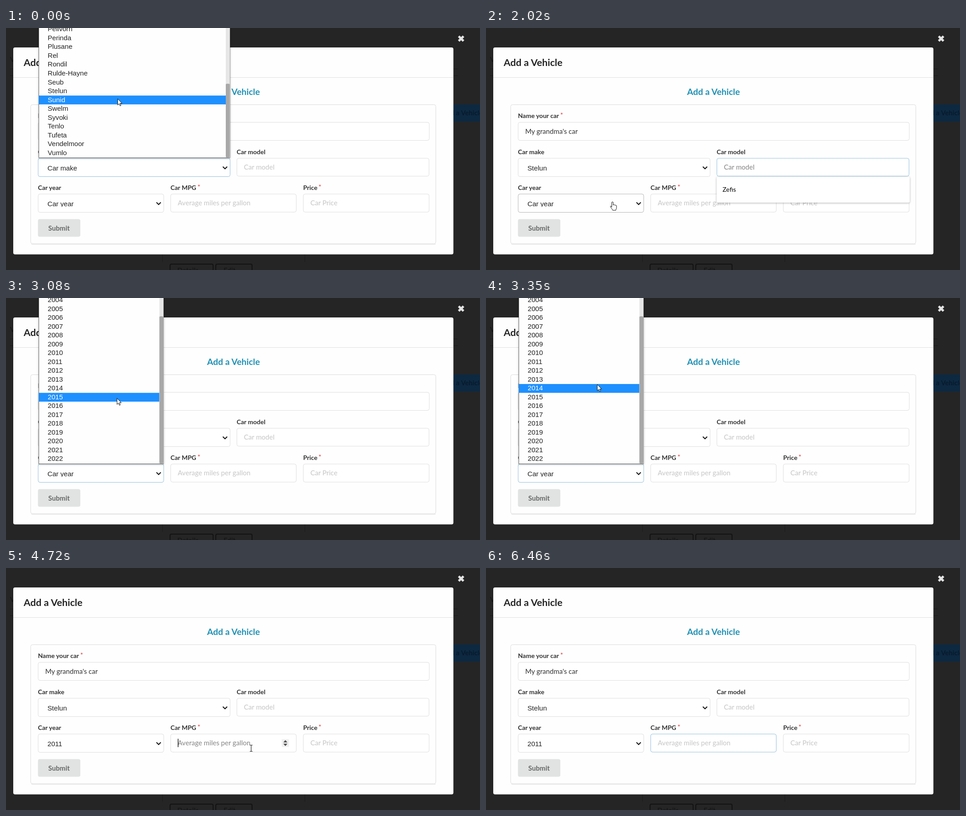
Recreate the animation shown at these times as an HTML page. Size 1046 by 535 pixels, loop 6560 ms.

```html
<!DOCTYPE html>
<html lang="en">
<head>
<meta charset="utf-8">
<title>Add a Vehicle</title>
<style>
  html, body { margin: 0; width: 100%; height: 100%; overflow: hidden; background: #252525; }
  svg { display: block; width: 100vw; height: 100vh; }
  text { font-family: Lato, sans-serif; font-size: 15.1px; fill: #333; white-space: pre; }
  .label { font-size: 14px; font-weight: 700; }
  .star { fill: #d8504e; }
  .hint { fill: #c6c6c6; }
  .hint.on { fill: #858585; }
  .native, .list text { font-family: "Liberation Sans", Arial, sans-serif; font-size: 15.1px; fill: #222; }
  .list text.on { fill: #fff; }
  .field { fill: #fff; stroke: #dedede; }
  .field.hover { stroke: #b4b4b5; }
  .field.focus { stroke: #92c0da; }
  .chevron { fill: none; stroke: #111; stroke-width: 2; }
  .list, .popup { filter: drop-shadow(0 1px 2px rgba(0, 0, 0, .3)); }
  .dim { fill: none; stroke: #191919; }
  .dimtext { fill: #161616; font-weight: 700; }
</style>
</head>
<body>
<svg id="stage" viewBox="0 0 1046 535">
  <defs>
    <clipPath id="yearClip"><rect x="85" y="370" width="200" height="25.3"/></clipPath>
  </defs>

  <!-- dimmed page -->
  <rect width="1046" height="535" fill="#252525"/>
  <text class="dimtext" x="9" y="75" font-size="19">Vehicles</text>
  <path class="dim" d="M9 90.5H997M9 105.5H997M345.5 495V517M659.5 495V517"/>
  <rect x="940" y="169" width="120" height="38" fill="#0d2941"/>
  <text x="962" y="193" style="fill:#081a2b;font-weight:700">Add a Vehicle</text>
  <g class="dim" style="stroke:#121212;stroke-width:2">
    <rect x="362" y="522" width="95" height="40" rx="3"/>
    <rect x="463" y="522" width="80" height="40" rx="3"/>
  </g>
  <text class="dimtext" x="378" y="541">Details</text>
  <text class="dimtext" x="480" y="541">Edit</text>
  <path d="M999 18.2L1009.6 28.8M1009.6 18.2L999 28.8" stroke="#e4e4e4" stroke-width="5"/>

  <!-- dialog -->
  <rect x="16" y="43" width="971.3" height="457.5" rx="4" fill="#fefefe"/>
  <path d="M16 109.5H987" stroke="#dedede"/>
  <text x="39" y="84" style="font-size:21.6px;font-weight:700;fill:#242424">Add a Vehicle</text>
  <text x="502" y="148" text-anchor="middle" style="font-size:19.4px;font-weight:700;fill:#2190b3">Add a Vehicle</text>
  <path d="M56 478H948" stroke="#ececec" stroke-width="2"/>
  <rect x="54.5" y="169.5" width="894" height="307.5" rx="4" fill="#fefefe" stroke="#dcdcdc"/>
  <g id="form"></g>
  <rect x="70.5" y="422.5" width="93.5" height="39" rx="4" fill="#e1e3e3"/>
  <text x="117" y="447.5" text-anchor="middle" style="font-weight:700;fill:#666">Submit</text>

  <g id="spinner">
    <rect x="608.5" y="378.5" width="16" height="17" fill="#efefef"/>
    <path d="M612 385.5l4.5-5 4.5 5zM612 388.5l4.5 5 4.5-5z" fill="#4d4d4d"/>
  </g>
  <path id="caret" d="M379.7 377.5V396" stroke="#111" stroke-width="1.4"/>
  <g id="popup" class="popup">
    <rect x="509" y="329" width="426" height="57" rx="3" fill="#fff"/>
    <text x="522" y="361.5" style="font-size:14px;fill:#000">Zefis</text>
  </g>
  <g id="lists"></g>

  <g id="cursor">
    <path id="arrow" d="M.5 .5V14.3L3.6 11.4 5.7 16.2 7.8 15.3 5.7 10.6H10Z" fill="#fff" stroke="#111"/>
    <path id="beam" d="M-3-7H-1L0-6.2 1-7H3M0-6.2V6.2M-3 7H-1L0 6.2 1 7H3" fill="none" stroke="#222" stroke-width="1.2"/>
    <path id="hand" transform="translate(-5)" fill="#fff" stroke="#111"
      d="M3.5 12V2a1.6 1.6 0 0 1 3.2 0v5.5c0-1.6 2.7-1.4 2.7.3 .3-1.3 2.5-1 2.5.6 .4-1 2.1-.6 2.1.8v4.3c0 2-1.5 3-1.5 5.5H5.5c0-2-4-5.5-5-8.2-.4-1.5 1.4-2 3 1.2Z"/>
  </g>
</svg>

<script>
const LOOP = 6560, ROW = 19.52;
const $ = id => document.getElementById(id);

function add(parent, tag, attrs, text) {
  const el = document.createElementNS('http://www.w3.org/2000/svg', tag);
  for (const k in attrs) el.setAttribute(k, attrs[k]);
  if (text) el.textContent = text;
  parent.appendChild(el);
  return el;
}
const show = (el, on) => el.style.display = on ? '' : 'none';

// form fields
function field(label, x, y, w, h, text, kind, required) {
  const form = $('form');
  const caption = add(form, 'text', { class: 'label', x, y: y - 9 }, label);
  if (required) add(caption, 'tspan', { class: 'star', dx: 3, dy: -2 }, '*');
  const box = add(form, 'rect', { x: x + .5, y: y + .5, width: w, height: h, rx: 4 });
  const select = kind === 'select';
  const value = add(form, 'text', {
    class: select ? 'native' : kind, x: x + (select ? 21 : 16), y: y + (select ? 27 : 25.5)
  }, text);
  if (select) add(form, 'path', { class: 'chevron', d: `M${x + w - 15.5} ${y + 19}l4.8 4.8 4.8-4.8` });
  const hit = (px, py) => px > x && px < x + w && py >= y && py < y + h;
  return { box, value, select, hit };
}
const fields = {
  name: field('Name your car', 70.5, 208, 863, 40, "My grandma's car", 'plain', true),
  make: field('Car make', 70.5, 287.5, 423.5, 40.5, 'Car make', 'select'),
  model: field('Car model', 509, 287.5, 424, 39.5, 'Car model', 'hint'),
  year: field('Car year', 70.5, 366.5, 277, 40.5, 'Car year', 'select'),
  mpg: field('Car MPG', 363, 366.5, 277, 40, 'Average miles per gallon', 'hint', true),
  price: field('Price', 655.7, 366.5, 277.5, 40, 'Car Price', 'hint', true)
};
fields.year.value.setAttribute('clip-path', 'url(#yearClip)');

// open option lists, 20 rows high
function optionList(id, items, right, bottom, total) {
  const top = bottom - 20 * ROW, g = add($('lists'), 'g', { class: 'list' });
  const clip = add(add(g, 'clipPath', { id }), 'rect', { x: 72, y: top, width: right - 72, height: 20 * ROW });
  add(g, 'rect', { x: 72.5, y: top, width: right - 72.5, height: 20 * ROW + .8, fill: '#fefefe', stroke: '#6e6e6e' });
  const mark = add(g, 'rect', { x: 72.5, width: right - 9 - 72.5, height: ROW, fill: '#1e90ff' });
  const rows = add(g, 'g', { 'clip-path': `url(#${id})` });
  const texts = items.map(t => add(rows, 'text', { x: 92 }, t));
  add(g, 'rect', { x: right - 9, y: top, width: 9, height: 20 * ROW, fill: '#e6e6e6' });
  const size = 400 / total * ROW;
  const thumb = add(g, 'rect', { x: right - 9, width: 8.5, height: size, rx: 2, fill: '#a8a8a8' });

  return (open, scroll, x, y) => {
    show(g, open);
    if (!open) return;
    thumb.setAttribute('y', top + scroll / total * 20 * ROW);
    const over = x > 72 && x < right - 9 && y < bottom;
    show(mark, over);
    texts.forEach((t, i) => {
      const rowTop = top + (total - items.length + i - scroll) * ROW;
      const on = over && y >= rowTop && y < rowTop + ROW;
      t.setAttribute('y', rowTop + 14.2);
      t.setAttribute('class', on ? 'on' : '');
      if (on) mark.setAttribute('y', rowTop);
    });
  };
}
const makes = ['Pelivorn', 'Perinda', 'Plusane', 'Rel', 'Rondil', 'Rulde-Hayne', 'Seub', 'Stelun',
  'Sunid', 'Swelm', 'Syvoki', 'Tenlo', 'Tufeta', 'Vendelmoor', 'Vumlo'];
const years = ['Car year', ...Array.from({ length: 23 }, (_, i) => String(2000 + i))];
const makeList = optionList('makeClip', makes, 494, 286, 48);
const yearList = optionList('yearRows', years, 347.5, 365.8, 24);

const ticks = [0, 120, 520, 670, 790, 940, 1090, 1210, 1360, 1510, 1630, 1780, 1900, 2020, 2170, 2290, 2440,
  2810, 2960, 3080, 3230, 3480, 3600, 3750, 3900, 4050, 4170, 4320, 4440, 4590, 4720, 4840, 4990,
  5270, 5420, 5540, 5690, 5810, 5960, 6090, 6340, 6460];

// pointer path: time, x, y
const path = [[0, 246, 156], [120, 246, 139], [520, 272, 198], [1210, 575, 306], [1510, 590, 316],
  [1630, 565, 335], [2020, 279, 384], [2290, 279, 384], [2440, 276, 380], [2810, 262, 322],
  [3080, 244.5, 221], [3480, 246, 140], [3600, 246, 143], [3750, 246, 222], [4440, 480, 414],
  [4720, 541, 398.5], [4840, 541, 398.5], [4990, 551, 395], [5270, 560, 393], [6090, 844, 408.5],
  [6340, 981, 89], [6560, 981, 89]];

function pointer(t) {
  const i = path.findIndex(p => p[0] > t);
  const [t0, x0, y0] = path[i - 1], [t1, x1, y1] = path[i];
  const k = (t - t0) / (t1 - t0);
  return [x0 + (x1 - x0) * k, y0 + (y1 - y0) * k];
}

function draw(t) {
  const [x, y] = pointer(t);
  const makeOpen = t < 520, yearOpen = t >= 2290 && t < 3600;
  const inList = makeOpen || yearOpen;
  const popupOpen = t >= 1360 && t < 2170;

  fields.make.value.textContent = makeOpen ? 'Car make' : 'Stelun';
  fields.year.value.textContent = t < 3600 ? 'Car year' : '2011';
  makeList(makeOpen, 28, x, y);
  yearList(yearOpen, t < 2440 ? 0 : 4, x, y);

  const focus = t < 1210 ? 'make' : t < 2170 ? 'model' : t < 4590 ? 'year' : t < 4840 ? '' : 'mpg';
  const active = t >= 1210 && t < 2170 ? 'model' : t >= 4720 && t < 6340 ? 'mpg' : '';
  let hovered = null;
  for (const id in fields) {
    const f = fields[id];
    const hover = !inList && f.hit(x, y);
    if (hover) hovered = f;
    f.box.setAttribute('class', 'field' + (id === focus ? ' focus' : hover && f.select ? ' hover' : ''));
    if (f.value.classList.contains('hint')) f.value.classList.toggle('on', id === active);
  }
  show($('popup'), popupOpen);
  show($('spinner'), hovered === fields.mpg && !popupOpen);
  show($('caret'), active === 'mpg' && (t < 5270 || t >= 5810));

  const shape = !hovered ? 'arrow' : hovered.select ? 'hand' : 'beam';
  for (const id of ['arrow', 'beam', 'hand']) show($(id), id === shape);
  show($('cursor'), t < 6460);
  $('cursor').setAttribute('transform', `translate(${x.toFixed(1)} ${y.toFixed(1)})`);
}

let last = -1;
function loop() {
  const now = performance.now() % LOOP;
  const t = ticks.filter(v => v <= now).pop();
  if (t !== last) draw(last = t);
  requestAnimationFrame(loop);
}
loop();
</script>
</body>
</html>
```
